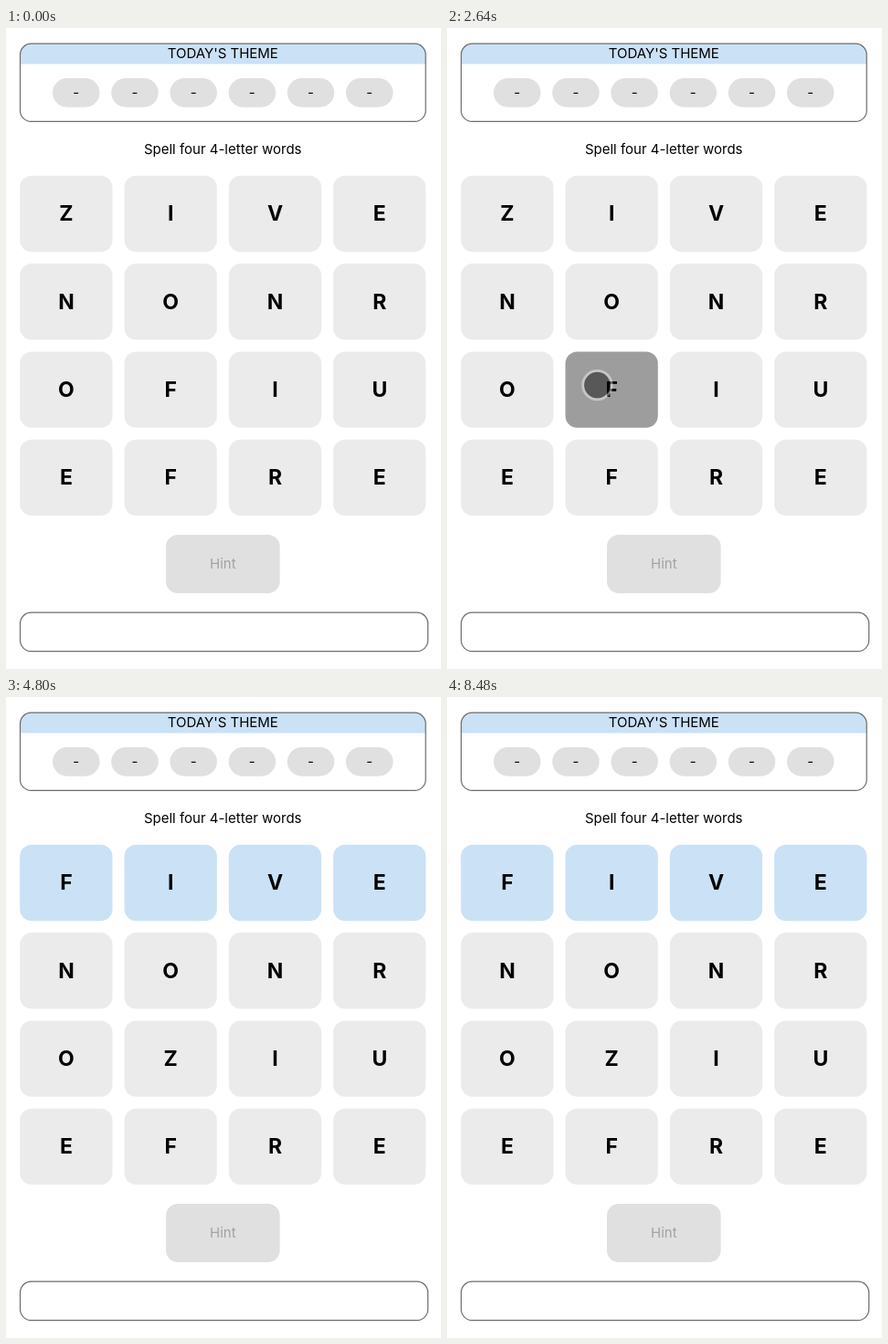
Animation of 476x702 px, one loop 8.56 s. Source, as an HTML page:

```html
<!DOCTYPE html>
<html lang="en">
<head>
<meta charset="utf-8">
<title>Letter swap puzzle</title>
<style>
  html, body { margin: 0; width: 100%; height: 100%; overflow: hidden; background: #fff; }
  svg { display: block; }
  text { font: 15px Inter, sans-serif; text-anchor: middle; fill: #000; }
  .letter { font-size: 23px; font-weight: 700; }
  .box { fill: none; stroke: #6c6c6c; stroke-width: 1.2; }
</style>
</head>
<body>
<svg id="stage" width="476" height="702" viewBox="0 0 476 702">
  <path d="M15.5 39.5V29a12 12 0 0 1 12-12H447a12 12 0 0 1 12 12V39.5Z" fill="#cbe1f6"/>
  <rect class="box" x="15.5" y="17.2" width="443.7" height="85.2" rx="12"/>
  <text x="237.3" y="33.2">TODAY'S THEME</text>
  <g id="pills"></g>
  <text x="237.2" y="138.2">Spell four 4-letter words</text>
  <g id="tiles"></g>
  <rect x="175" y="555" width="124.6" height="64" rx="13" fill="#e0e0e0"/>
  <text x="237.3" y="592.4" style="fill:#a2a2a2">Hint</text>
  <rect class="box" x="15.5" y="640.2" width="446.2" height="42.4" rx="12"/>
  <g id="cursor">
    <circle r="14.4" fill="#000" fill-opacity=".44"/>
    <circle r="15.8" fill="none" stroke="#fff" stroke-width="2.8" stroke-opacity=".42"/>
  </g>
</svg>
<script>
const LOOP = 8560, STEP = 80;
const GREY = '#ebebeb', DARK = '#9d9d9d', BLUE = '#cbe1f6';
const PRESS = 2240, SWAP = 4000;
const FIRST = 0, SECOND = 9;            // the two tiles that trade letters
const REST = [171.5, 405], DROP = [71.5, 208.5];

const byId = id => document.getElementById(id);
const clamp = v => Math.max(0, Math.min(1, v));
const progress = (t, from, to) => clamp((t - from) / (to - from));
const mix = (a, b, p) => a + (b - a) * p;

function add(parent, tag, attrs, label) {
  const el = document.createElementNS('http://www.w3.org/2000/svg', tag);
  for (const key in attrs) el.setAttribute(key, attrs[key]);
  if (label) el.textContent = label;
  parent.appendChild(el);
  return el;
}

for (let i = 0; i < 6; i++) {
  const x = 51 + i * 64.2;
  add(byId('pills'), 'rect', { x, y: 55, width: 51.5, height: 31.7, rx: 15.85, fill: '#e0e0e0' });
  add(byId('pills'), 'text', { x: x + 25.7, y: 76 }, '-');
}

const tiles = [...'ZIVENONROFIUEFRE'].map((char, i) => {
  const x = 15.2 + (i % 4) * 114.3, y = 161.8 + Math.floor(i / 4) * 96.3;
  const group = add(byId('tiles'), 'g', {});
  const rect = add(group, 'rect', { x, y, width: 101.3, height: 83.4, rx: 13 });
  const text = add(group, 'text', { class: 'letter', x: x + 50.7, y: y + 49.4 }, char);
  return { group, rect, text };
});

// Curves in from below the stage, rests, then slides to the top left tile
function cursorAt(t) {
  if (t < 2560) {
    const p = 1 - (1 - progress(t, 720, 1760)) ** 2;
    const curve = (a, b, c) => mix(mix(a, b, p), mix(b, c, p), p);
    return [curve(138, 118, REST[0]), curve(745, 425, REST[1])];
  }
  const u = progress(t, 2560, 3280);
  const p = (Math.sin(u * Math.PI / 2) ** 2 + u) / 2;
  return REST.map((v, i) => mix(v, DROP[i], p));
}

function draw(t) {
  const swapped = t >= SWAP;
  tiles.forEach(({ rect }, i) => {
    const held = i === SECOND && t >= PRESS && !swapped;
    rect.setAttribute('fill', swapped && i < 4 ? BLUE : held ? DARK : GREY);
  });
  tiles[FIRST].text.textContent = swapped ? 'F' : 'Z';
  tiles[SECOND].text.textContent = swapped ? 'Z' : 'F';
  const shown = swapped ? progress(t, SWAP, SWAP + 160) : 1;
  for (const i of [FIRST, SECOND]) tiles[i].group.setAttribute('opacity', shown);

  const cursor = byId('cursor');
  cursor.setAttribute('transform', `translate(${cursorAt(t).join(' ')})`);
  cursor.setAttribute('opacity', t < 800 ? 0 : 1 - progress(t, 4240, 4480));
}

function tick() {
  const t = performance.now() % LOOP;
  draw(Math.floor(t / STEP) * STEP);
  requestAnimationFrame(tick);
}
tick();
</script>
</body>
</html>
```
